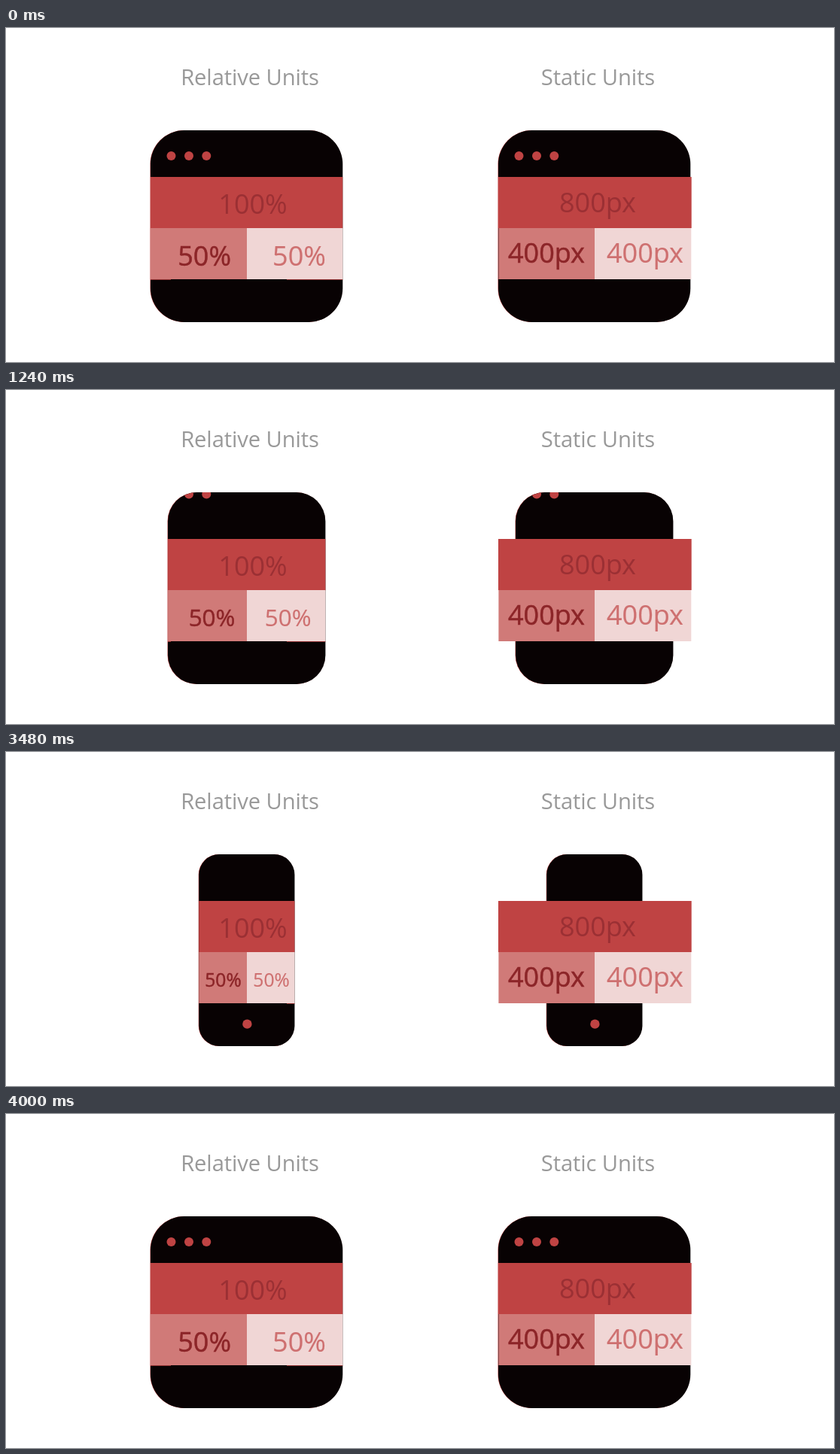
Animation of 1100 by 444 pixels, one loop 5.04 s. Source, as an HTML page:

```html
<!DOCTYPE html>
<html lang="en">
<head>
<meta charset="utf-8">
<title>Relative and static units</title>
<style>
  html, body { margin: 0; width: 100%; height: 100%; overflow: hidden; background: #fff; }
  svg { display: block; width: 1100px; height: 444px; }
  text { font: 36px "Open Sans", "Noto Sans", sans-serif; text-anchor: middle; }
  .title { font-size: 29.2px; letter-spacing: -.1px; fill: #999; }
  .case { fill: #080203; }
  .red { fill: #bf4343; }
  .rose { fill: #d07a78; }
  .pale { fill: #f0d6d5; }
  .on-red { fill: #9b3034; }
  .on-rose { fill: #8c2528; stroke: #8c2528; stroke-width: .5px; }
  .on-pale { fill: #ce7070; stroke: #ce7070; stroke-width: .2px; }
</style>
</head>
<body>
<svg viewBox="0 0 1100 444">
  <defs>
    <clipPath id="outline"><rect class="body" y="136" height="255"/></clipPath>
    <clipPath id="column"><rect class="body-width" y="136" height="255"/></clipPath>
    <g id="device">
      <rect class="body red" y="136" height="255" transform="translate(-.5 0)"/>
      <rect class="body case" y="136" height="255"/>
      <g clip-path="url(#outline)">
        <g class="dots red">
          <circle cx="219.5" cy="170" r="6"/>
          <circle cx="243" cy="170" r="6"/>
          <circle cx="266.3" cy="170" r="6"/>
        </g>
        <circle class="home red" cx="320.4" cy="361.5" r="6.2"/>
      </g>
    </g>
  </defs>

  <text class="title" x="324" y="76">Relative Units</text>
  <text class="title" x="786.5" y="76">Static Units</text>

  <use href="#device"/>
  <g clip-path="url(#column)">
    <rect class="red" x="190" y="198" width="260" height="68.5"/>
    <rect class="rose" x="190" y="266" width="130" height="68"/>
    <rect class="pale" x="320" y="266" width="130" height="68"/>
    <path class="red" d="M190 334h29v.8h-29zM373 334h77v.8h-77z"/>
  </g>
  <text class="on-red" x="328" y="247">100%</text>
  <text class="half on-rose">50%</text>
  <text class="half on-pale">50%</text>

  <use href="#device" x="462"/>
  <rect class="red" x="654" y="198" width="256.7" height="68"/>
  <rect class="rose" x="654.4" y="266" width="128" height="68"/>
  <rect class="pale" x="782" y="266" width="128.3" height="68"/>
  <text class="on-red" x="786" y="245">800px</text>
  <text class="on-rose" x="718" y="312">400px</text>
  <text class="on-pale" x="849" y="312">400px</text>
</svg>
<script>
  const LOOP = 5040, TICK = 40, STEPS = 14, SHRINK = 1040, GROW = 3480;
  const all = s => document.querySelectorAll(s);
  const bodies = all('.body, .body-width');
  const dots = all('.dots')[0], home = all('.home')[0];
  const [leftHalf, rightHalf] = all('.half');

  const mix = (a, b, p) => a + (b - a) * p;
  const set = (el, attrs) => {
    for (const key in attrs) el.setAttribute(key, attrs[key]);
  };
  // symmetric ease-in-out with a chosen power
  const ease = (u, n) => u < .5 ? Math.pow(2 * u, n) / 2 : 1 - Math.pow(2 - 2 * u, n) / 2;
  // stepped 0..1 ramp beginning at a given time
  const ramp = (t, start) =>
    Math.max(0, Math.min(STEPS, Math.floor((t - start) / TICK) + 1)) / STEPS;

  function placeHalf(el, x, p) {
    const size = mix(36, 24.4, p);
    el.style.fontSize = size + 'px';
    set(el, { x, y: 303 + size * .357 });
  }

  function draw(t) {
    const u = ramp(t, SHRINK) - ramp(t, GROW);
    const size = ease(u, 2.2), slide = ease(u, 3), label = ease(u, 1.6);

    const x = mix(192, 256.7, size), width = mix(255.3, 126.3, size);
    for (const el of bodies) {
      const rx = el.classList.contains('body') ? mix(45, 27, size) : 0;
      set(el, { x, width, rx });
    }
    set(dots, { transform: `translate(0 ${-100 * slide})` });
    set(home, { transform: `translate(0 ${100 * (1 - slide)})` });
    placeHalf(leftHalf, mix(263.7, 289, label), label);
    placeHalf(rightHalf, mix(389.5, 351.7, label), label);
  }

  const begin = performance.now();
  function frame() {
    draw((performance.now() - begin) % LOOP);
    requestAnimationFrame(frame);
  }
  draw(0);
  requestAnimationFrame(frame);
</script>
</body>
</html>
```
